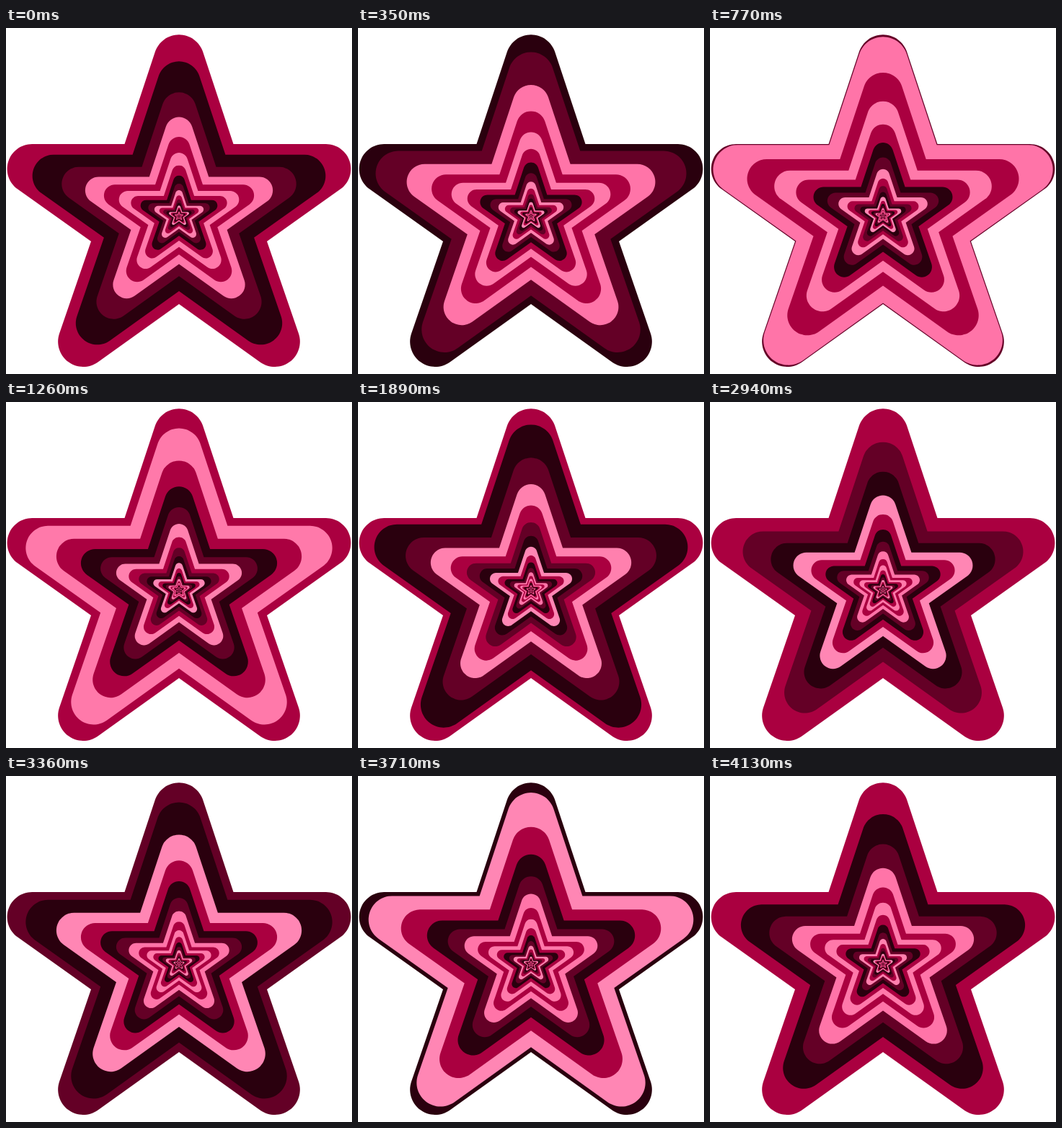
Write an HTML page with a canvas that moves like this. It is 480 px wide and 480 px high and loops after 4.2 s.

```html
<!DOCTYPE html>
<html lang="en">
<head>
<meta charset="utf-8">
<title>Star tunnel</title>
<style>
  html, body { margin: 0; width: 100%; height: 100%; overflow: hidden; background: #fff; }
  canvas { display: block; }
</style>
</head>
<body>
<canvas id="stage" width="480" height="480"></canvas>
<script>
const ctx = document.getElementById('stage').getContext('2d');

const CENTER = [240, 261];
const RATIO = 0.8;        // size of each star relative to the one around it
const RINGS = 32;
const START = 0.288;      // how far the outermost star is past the rim at time 0
const STEP_MS = 70, STEPS = 60;

const C = '#aa0040', U = '#640026', B = '#2a000e';
const COLORS = [C, B, U, '#ff74a8', C, '#ff79aa', C, B, U, '#ff80ae', C, U, B, '#ff86b4'];

// Right half, top to bottom: [tip corner, tip radius, next notch]
const ARMS = [
  [[240, -67], 35, [315.5, 161]],
  [[552, 161], 34.5, [362, 296]],
  [[441.6, 527.3], 35, [240, 383]]
];
const mirror = ([x, y]) => [480 - x, y];

function makeStar() {
  const path = [];
  for (const [tip, r, notch] of ARMS) path.push({ tip, r, notch });
  path.push({ tip: mirror(ARMS[2][0]), r: ARMS[2][1], notch: mirror(ARMS[1][2]) });
  path.push({ tip: mirror(ARMS[1][0]), r: ARMS[1][1], notch: mirror(ARMS[0][2]) });
  const star = new Path2D();
  star.moveTo(...mirror(ARMS[0][2]));
  for (const { tip, r, notch } of path) {
    star.arcTo(...tip, ...notch, r);
    star.lineTo(...notch);
  }
  star.closePath();
  return star;
}
const star = makeStar();

function drawStar(scale, color) {
  ctx.save();
  ctx.translate(...CENTER);
  ctx.scale(scale, scale);
  ctx.translate(-CENTER[0], -CENTER[1]);
  ctx.fillStyle = color;
  ctx.fill(star);
  ctx.restore();
}

function draw() {
  const step = Math.floor(performance.now() / STEP_MS) % STEPS;
  // 100 zoom positions shown in 60 steps: advances by 2, 2, 1
  const zoom = START + COLORS.length * Math.ceil(step * 5 / 3) / 100;
  const first = Math.floor(zoom);
  ctx.clearRect(0, 0, 480, 480);
  for (let i = first; i < first + RINGS; i++) {
    const scale = i === first ? 1 : RATIO ** (i - zoom);
    drawStar(scale, COLORS[i % COLORS.length]);
  }
  requestAnimationFrame(draw);
}
draw();
</script>
</body>
</html>
```
